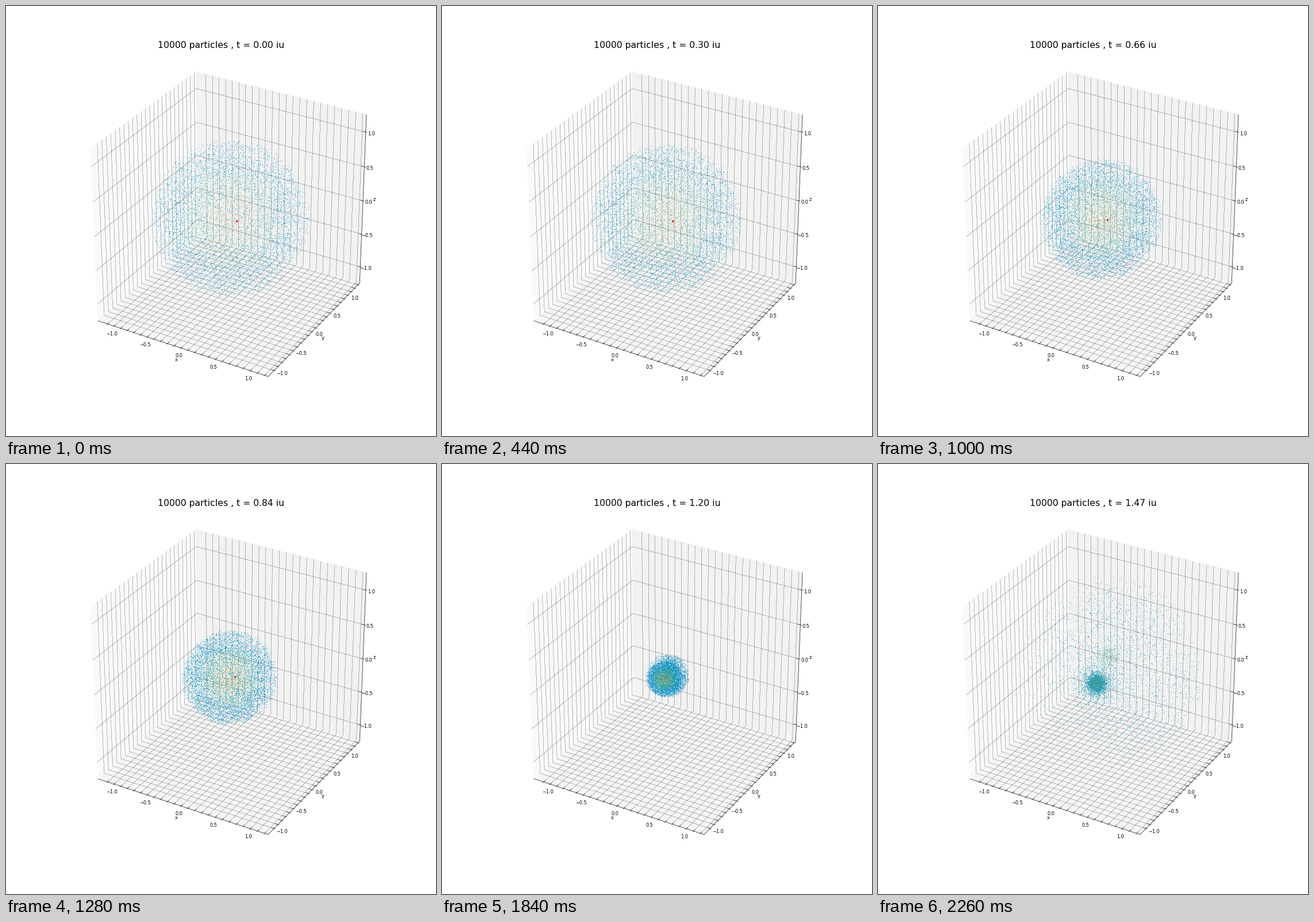
Recreate the animation shown at these times as a matplotlib script. Size 748 by 748 pixels, loop 2.28 s.

```python
import numpy as np
import matplotlib.pyplot as plt
from matplotlib.animation import FuncAnimation
from matplotlib.collections import LineCollection
from matplotlib.colors import LinearSegmentedColormap
from matplotlib.patches import Polygon

SIZE = 748
PT = 0.72                       # points per pixel at 100 dpi
CX, CY, ZOOM, DIST = 391.1, 369.8, 3284.6, 24.0
WALL = 1.25
COUNT = 10000
STATES = 50
STEP = 0.03
BOUNCE = 1.13

plt.rcParams["font.family"] = "DejaVu Sans"
fig = plt.figure(figsize=(SIZE / 100, SIZE / 100), dpi=100, facecolor="white")
ax = fig.add_axes([0, 0, 1, 1])
ax.set_xlim(0, SIZE)
ax.set_ylim(SIZE, 0)
ax.axis("off")


def screen(u, v, w):
    """Perspective from view coordinates (right, up, towards viewer) to pixels."""
    k = ZOOM / (DIST - w)
    return CX + k * u, CY - k * v


def project(x, y, z):
    """Box coordinates seen from elevation 30, azimuth -60."""
    a, b = np.sqrt(3) / 2, 0.5
    return screen(a * x + b * y,
                  -b * b * x + a * b * y + a * z,
                  a * b * x - a * a * y + b * z)


def lines(paths, width):
    pixels = [[project(*p) for p in path] for path in paths]
    ax.add_collection(LineCollection(pixels, colors="black", linewidths=width * PT,
                                     capstyle="butt", snap=False, zorder=2))


def text(x, y, s, size, **kw):
    return ax.text(x, y, s, fontsize=size * PT, ha="center", zorder=6, **kw)


# --- box, grid and axes -------------------------------------------------
L = WALL
panes = [
    ("#f9f9f9", [(-L, -L, -L), (-L, L, -L), (-L, L, L), (-L, -L, L)]),
    ("#f2f2f2", [(-L, L, -L), (L, L, -L), (L, L, L), (-L, L, L)]),
    ("#f5f5f5", [(-L, -L, -L), (L, -L, -L), (L, L, -L), (-L, L, -L)]),
]
for color, corners in panes:
    ax.add_patch(Polygon([project(*c) for c in corners], fc=color, ec="none", zorder=1))

fine = np.arange(-11, 13) / 10
coarse = np.arange(-2, 3) / 2
lines([[(x, L, L), (x, L, -L), (x, -L, -L)] for x in fine]
      + [[(-L, y, L), (-L, y, -L), (L, y, -L)] for y in fine]
      + [[(-L, -L, z), (-L, L, z), (L, L, z)] for z in coarse], 0.26)
lines([[(-L, -L, -L), (L, -L, -L)], [(L, -L, -L), (L, L, -L)],
       [(L, L, -L), (L, L, L)]], 0.65)

OUT, IN = L + 0.02, L - 0.04
lines([[(x, -OUT, -L), (x, -IN, -L)] for x in fine]
      + [[(OUT, y, -L), (IN, y, -L)] for y in fine]
      + [[(OUT, L, z), (IN, L, z)] for z in coarse], 0.6)

Q = 1.32
for value in coarse:
    label = f"{value:.1f}".replace("-", "\u2212")
    spots = [((value, -Q, -Q), 1.2, 0.8), ((Q, value, -Q), -2, 1), ((Q, Q, value), -3.2, 4.4)]
    for point, dx, dy in spots:
        px, py = project(*point)
        text(px + dx, py + dy, label, 8.3, va="center")
for name, px, py in [("x", 296.5, 615), ("y", 551.5, 577), ("z", 640.5, 336.5)]:
    text(px, py, name, 8.3, va="center")

title = text(374.4, 72.7, "", 15.65, va="baseline")

# --- particles ----------------------------------------------------------
rng = np.random.default_rng(7)


def unit(vectors):
    return vectors / np.linalg.norm(vectors, axis=1, keepdims=True)


start = unit(rng.normal(size=(COUNT, 3))) * rng.random((COUNT, 1)) ** (1 / 3)

# Small ripples that grow into clumps while the ball shrinks.
ripple = np.zeros_like(start)
for wave in unit(rng.normal(size=(14, 3))) * rng.uniform(7, 15, (14, 1)):
    phase = rng.uniform(0, 2 * np.pi)
    ripple += np.sin(start @ wave + phase)[:, None] * wave / np.linalg.norm(wave)

depth_mix = np.sqrt(start[:, 0] ** 2 + start[:, 1] ** 2 + 0.6 * start[:, 2] ** 2)
shades = LinearSegmentedColormap.from_list("shells", [
    (0, "#e08a28"), (0.2, "#dd9f38"), (0.34, "#a3b565"),
    (0.45, "#62b385"), (0.58, "#52ae92"), (0.68, "#0e93c4"), (1, "#0a8fc6")])
colors = shades(np.clip(depth_mix, 0, 1))
strength = np.clip(0.8 + 0.2 * (depth_mix - 0.5) / 0.15, 0.8, 1)

# Fate after the bounce: thrown out, a small side clump, or bound in the core.
outer = depth_mix > 0.62
thrown = rng.random(COUNT) < np.where(outer, 0.45, 0.12)
side = ~thrown & (rng.random(COUNT) < np.where(outer, 0.02, 0.10))

streams = np.array([(0.55, 0.6, 0.5), (0.9, -0.2, 0.3), (0.55, -0.75, 0.2),
                    (0.0, 0.75, 0.6), (-0.5, 0.1, 0.8), (-0.1, -0.55, 0.8)])
heading = streams[rng.integers(0, len(streams), COUNT)] + 0.33 * rng.normal(size=(COUNT, 3))
free = rng.random(COUNT) < 0.5
heading[free] = rng.normal(size=(free.sum(), 3)) + (0.2, 0.25, 0)
velocity = unit(heading) * 3.7 * rng.random((COUNT, 1)) ** 0.45
velocity[side] = np.array([0.22, 0.6, 0]) + 0.22 * rng.normal(size=(side.sum(), 3))

spread = np.where(rng.random(COUNT) < 0.75, 0.055, 0.12) * (0.5 + 0.65 * depth_mix)
core = rng.normal(size=(COUNT, 3)) * spread[:, None]

theta = np.linspace(0, np.pi / 2, 500)
fall_time = (theta + np.sin(2 * theta) / 2) / 1.4
fall_radius = 1.01 * np.cos(theta) ** 2


def smooth(x):
    x = min(max(x, 0), 1)
    return x * x * (3 - 2 * x)


def core_centre(t):
    return np.array([-0.08, -0.09, 0]) * smooth((t - 1.05) / 0.4)


def positions(t):
    radius = np.interp(t, fall_time, fall_radius)
    growth = 0.010 * (1 / max(radius, 0.2) - 1)
    before = (start + growth * ripple) * radius - 0.018 * t * np.array([1, 1, 0])
    turn = smooth((t - 1.0) / 0.16)
    if turn == 0:
        return before
    since = np.hypot(max(t - BOUNCE, 0), 0.03)
    settle = smooth((t - 1.15) / 0.3)
    after = core_centre(t) + 0.25 * start * (1 - settle) + core * settle
    flying = thrown | side
    after[flying] = velocity[flying] * since + np.array([0.06, 0.16, 0]) * since
    return before + (after - before) * turn


def red_spot(t):
    path = np.array([0.073 - 0.03 * t * t, -0.034 + 0.045 * t * t, 0])
    return path + (core_centre(t) - path) * smooth((t - 1.0) / 0.3)


spot = ax.scatter([0], [0], s=(3.6 * PT) ** 2, c="red", linewidths=0, zorder=3)
dots = ax.scatter(np.zeros(COUNT), np.zeros(COUNT), s=PT ** 2, marker="s",
                  c=colors, linewidths=0, snap=True, zorder=4)

# Every third state is held longer, except the last one.
order = [s for s in range(STATES)
         for _ in range(5 if s % 3 == 1 and s < STATES - 1 else 1)]


def draw(i):
    t = order[i] * STEP
    p = positions(t)
    w = p[:, 2]
    near = (w - w.min()) / (w.max() - w.min())
    rgba = colors.copy()
    rgba[:, 3] = (0.3 + 0.7 * near) * strength
    dots.set_offsets(np.column_stack(screen(*p.T)))
    dots.set_facecolors(rgba)
    spot.set_offsets([screen(*red_spot(t))])
    title.set_text(f"{COUNT} particles , t = {t:.2f} iu")
    return dots, spot, title


anim = FuncAnimation(fig, draw, frames=len(order), interval=20, repeat=True,
                     repeat_delay=0, blit=False, cache_frame_data=False)
plt.show()
```
